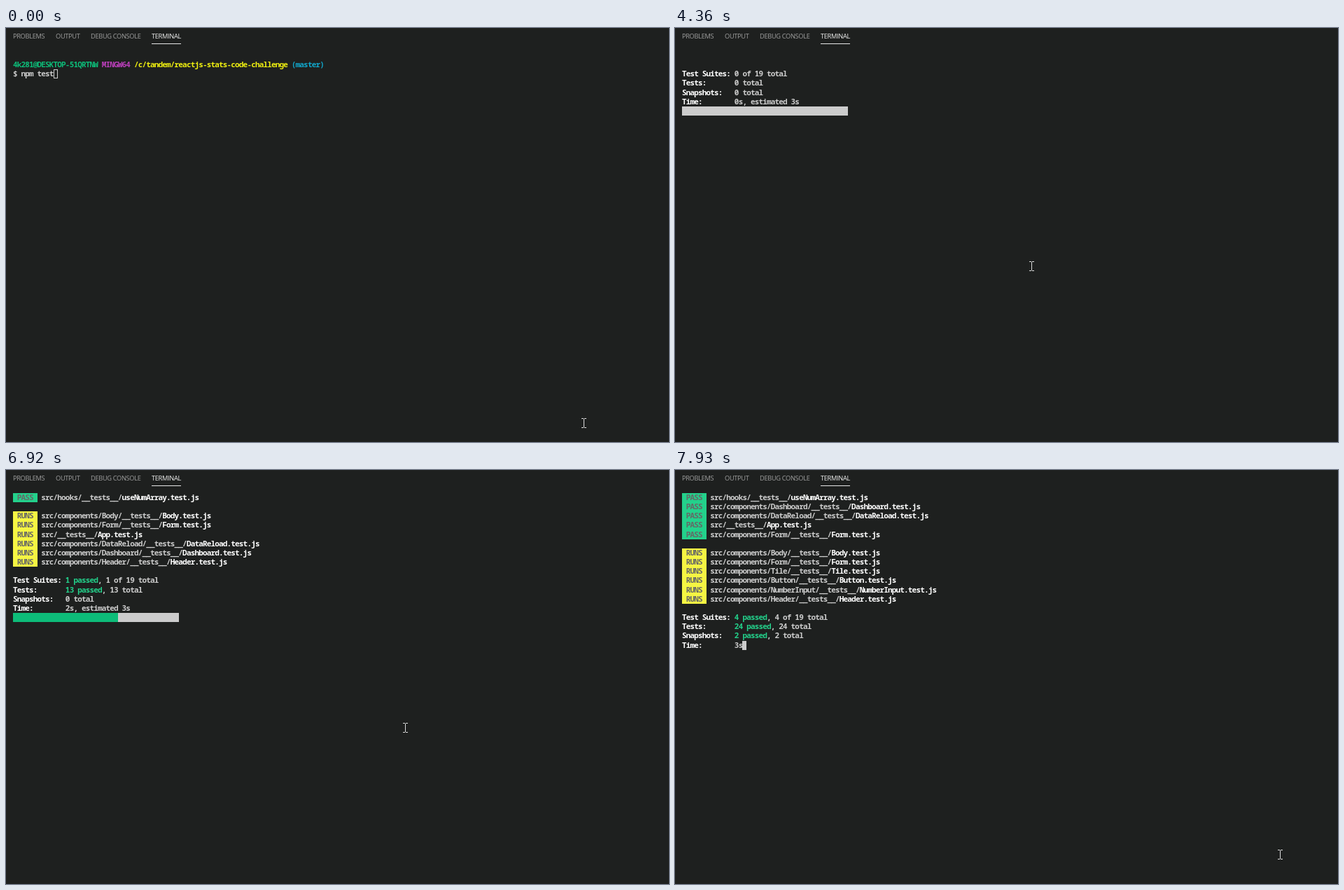
Write an HTML page that moves like this. It is 947 by 591 pixels and loops after 8000 ms.

```html
<!DOCTYPE html>
<html lang="en">
<head>
<meta charset="utf-8">
<title>Terminal test run</title>
<style>
  html, body { margin: 0; width: 100%; height: 100%; overflow: hidden; background: #1e201f; }
  #tabs span { position: absolute; top: 5px; font: 9.3px/13px "Open Sans", "Noto Sans", sans-serif; letter-spacing: -.36px; color: #a0a0a0; white-space: pre; }
  #tabs .on { color: #f0f0f0; }
  #tabs i { position: absolute; left: 208px; top: 22px; width: 42px; height: 1px; background: #e7e7e7; }
  #term span {
    position: absolute; white-space: pre; color: #ccc;
    font: 700 11px/11.8px "Noto Sans Mono", "DejaVu Sans Mono", monospace;
    letter-spacing: -.833px; font-variant-ligatures: none;
  }
  #term .b { color: #fff; font-weight: 800; }
  #term .d { color: #8c8c8c; }
  #term .user { color: #0dbc79; }
  #term .sys { color: #bc3fbc; }
  #term .path { color: #f0f010; }
  #term .git { color: #11a8cd; }
  #term .ok { color: #23d18b; }
  #term .pass { background: #23d18b; color: #666; }
  #term .runs { background: #f5f543; color: #666; }
  #term .done { background: #0dbc79; }
  #term .todo { background: #ccc; }
  #caret { position: absolute; width: 6px; box-sizing: border-box; background: #ccc; }
  #caret.hollow { background: none; border: 1px solid #ccc; }
  #mouse { position: absolute; left: 0; top: 0; overflow: visible; }
</style>
</head>
<body>
<div id="tabs">
  <span style="left:10px">PROBLEMS</span>
  <span style="left:71px">OUTPUT</span>
  <span style="left:121px">DEBUG CONSOLE</span>
  <span class="on" style="left:208px">TERMINAL</span>
  <i></i>
</div>
<div id="term"></div>
<div id="caret"></div>
<svg id="mouse" width="1" height="1">
  <circle id="ring" cx="-1" cy="-1" r="10" fill="#ff0" fill-opacity=".47"/>
  <path id="beam" d="M-3 -6.5H0M1 -6.5H4M.5 -6V6M-3 6.5H0M1 6.5H4" fill="none" stroke="#ddd"/>
</svg>
<script>
const LOOP = 8000, CELL = 5.767, ROW = 13.17, LEFT = 9.9, TOP = 32.9;
const $ = id => document.getElementById(id);
const rowTop = r => Math.round(TOP + r * ROW);

// A line is a flat list: class, text, class, text...
const prompt = ['user', '4k281@DESKTOP-51QRTNW', '', ' ', 'sys', 'MINGW64', '', ' ',
  'path', '/c/tandem/reactjs-stats-code-challenge', '', ' ', 'git', '(master)'];
const typed = [[], prompt, ['', '$ npm test']];
const started = [...typed, [],
  ['', '> reactjs-stats-code-challenge@1.0.0 test C:\\tandem\\reactjs-stats-code-challenge'],
  ['', '> react-scripts test']];

const press = (key, what) => ['d', ' › Press ', '', key, 'd', ' to ' + what + '.'];
const usage = [
  ['b', 'No tests found related to files changed since last commit.'],
  ['d', 'Press `a` to run all tests, or run Jest with `--watchAll`.'],
  [], ['b', 'Watch Usage'],
  press('a', 'run all tests'),
  press('f', 'run only failed tests'),
  press('q', 'quit watch mode'),
  press('p', 'filter by a filename regex pattern'),
  press('t', 'filter by a test name regex pattern'),
  press('Enter', 'trigger a test run')
];

const folder = name => name === 'App' ? '' : name === 'useNumArray' ? 'hooks/' : `components/${name}/`;
const file = (kind, name) => [kind, ` ${kind.toUpperCase()} `, '', ` src/${folder(name)}__tests__/`, 'b', name + '.test.js'];
const tally = (label, n, total) =>
  ['b', label.padEnd(13), ...(n ? ['ok', n + ' passed', '', ', '] : []), '', total + ' total'];

function report(pass, runs, suites, tests, snaps, sec) {
  const lines = [
    ...pass.map(n => file('pass', n)), [],
    ...runs.map(n => file('runs', n)), [],
    tally('Test Suites:', suites, suites + ' of 19'),
    tally('Tests:', tests, tests),
    tally('Snapshots:', snaps, snaps),
    ['b', 'Time:'.padEnd(13), '', sec + 's' + (sec < 3 ? ', estimated 3s' : '')]
  ];
  if (sec > 2) return [lines, 15, lines.length - 1];
  const done = Math.floor(sec / 3 * 40);
  lines.push(['done', ' '.repeat(done), 'todo', ' '.repeat(40 - done)]);
  return [lines, 40, lines.length - 1];
}

const first = ['Body', 'Form', 'App', 'DataReload', 'Dashboard', 'useNumArray'];
const swap = (list, out, into) => list.map(n => n === out ? into : n);
const second = swap(first, 'useNumArray', 'Header');
const third = swap(second, 'Dashboard', 'NumberInput');
const fourth = swap(third, 'DataReload', 'Button');
const fifth = swap(fourth, 'App', 'Tile');
const passed = ['useNumArray', 'Dashboard', 'DataReload', 'App', 'Form'];

// [start, lines, caret column, caret row, hollow caret]
const screens = [
  [0, typed, 10, 2, true],
  [230, typed, 10, 2],
  [1080, typed, 0, 3],
  [1860, started, 0, 7],
  [3650, [], 0, 0],
  [3730, [['d', 'Determining test suites to run...']], 33, 0],
  [3810, usage, 0, 10],
  [4360, ...report([], [], 0, 0, 0, 0)],
  [4430, ...report([], first.slice(0, 1), 0, 0, 0, 0)],
  [4500, ...report([], first, 0, 0, 0, 0)],
  [5440, ...report([], first, 0, 0, 0, 1)],
  [6450, [], 0, 0],
  [6520, ...report([], first, 0, 0, 0, 2)],
  [6920, ...report(passed.slice(0, 1), second, 1, 13, 0, 2)],
  [7465, ...report(passed.slice(0, 1), second, 1, 13, 0, 3)],
  [7770, ...report(passed.slice(0, 2), third, 2, 15, 0, 3)],
  [7850, ...report(passed.slice(0, 3), fourth, 3, 18, 1, 3)],
  [7930, ...report(passed, fifth, 4, 24, 2, 3)]
];

// [start, x, y], held until the next entry
const moves = [[0, 825, 564], [70, 700, 472], [150, 560, 377], [230, 509, 340]];
for (let i = 0; i < 11; i++) {
  const a = Math.sin(Math.min(1, (i + 1) / 7) * Math.PI / 2), b = Math.max(0, (i - 6) / 4);
  moves.push([6920 + i * 78, Math.round(509 + 272 * a + 30 * b), Math.round(340 + 126 * a + 26 * b)]);
}
moves.push([7770, 825, 508], [7850, 845, 529], [7930, 864, 549]);

const at = (table, t) => table.findLast(step => step[0] <= t);
let shown;

function place(el, col, row) {
  el.style.left = LEFT + col * CELL + 'px';
  el.style.top = rowTop(row) + 'px';
  el.style.height = rowTop(row + 1) - rowTop(row) + 'px';
}

function draw([, lines, col, row, hollow]) {
  const spans = [];
  lines.forEach((line, r) => {
    let c = 0;
    for (let i = 0; i < line.length; i += 2) {
      const span = document.createElement('span');
      span.className = line[i];
      span.textContent = line[i + 1];
      place(span, c, r);
      spans.push(span);
      c += line[i + 1].length;
    }
  });
  $('term').replaceChildren(...spans);
  $('caret').className = hollow ? 'hollow' : '';
  place($('caret'), col, row);
}

function tick() {
  const t = performance.now() % LOOP;
  const screen = at(screens, t);
  if (screen !== shown) draw(shown = screen);
  const [, x, y] = at(moves, t);
  $('mouse').style.transform = `translate(${x}px, ${y}px)`;
  $('ring').style.display = t >= 230 && t < 400 ? '' : 'none';
  $('beam').style.display = t >= 400 && t < 540 ? 'none' : '';
  requestAnimationFrame(tick);
}
tick();
</script>
</body>
</html>
```
